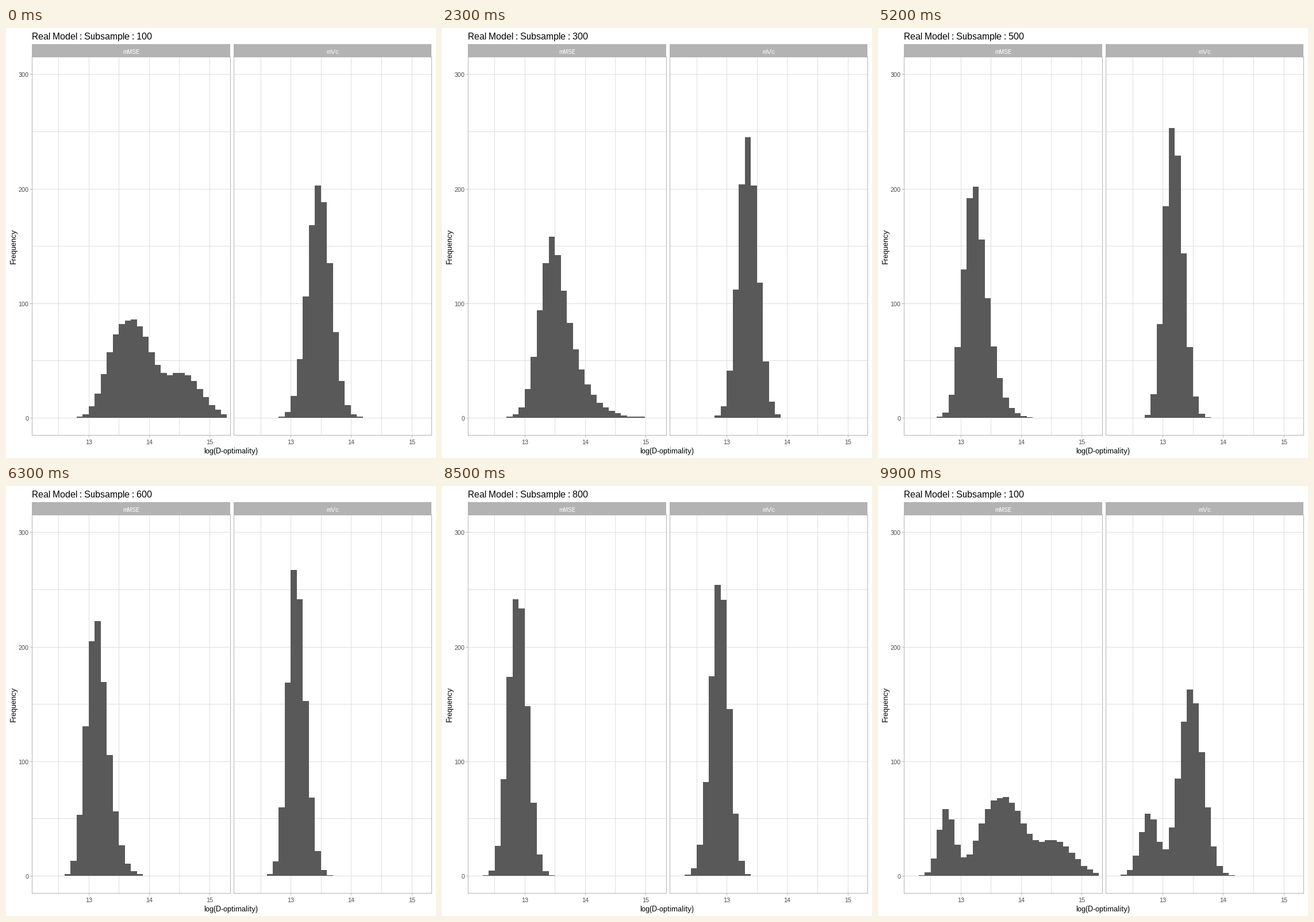
These frames come from a looping animation (748x748 px, 10 s). A matplotlib script:

```python
import numpy as np
import matplotlib.pyplot as plt
from matplotlib.animation import FuncAnimation
from matplotlib.patches import Rectangle

SIZE, DPI = 748, 88
BAR, GRID, EDGE, TICK_TEXT = "#595959", "#DEDEDE", "#B3B3B3", "#4D4D4D"
LOW, BINS = 12.3, 30          # first bin edge, number of 0.1-wide bins
BIN_PX, UNIT_PX, COUNT_PX = 10.46, 105.08, 1.993
ORIGIN, BASE_Y = 144.35, 678.6
LEFT, WIDTH, PANEL_STEP = 45.4, 345, 351.5
TOP, BOTTOM = 50, 708
FRAMES, STATES = 100, 9

centers = LOW + 0.05 + 0.1 * np.arange(BINS)


def bump(mode, left, right, power=2.0, total=1000):
    """Counts of a bell whose two sides have their own width."""
    d = centers - mode
    y = np.where(d < 0, np.exp(-np.abs(d / left) ** max(power, 2)),
                 np.exp(-np.abs(d / right) ** power))
    return np.round(total * y / y.sum())


# mode, left width and right width; the bells narrow as the subsample grows
MMSE = [(13.57, .332, .45), (13.48, .315, .375), (13.29, .198, .40),
        (13.24, .245, .295), (13.14, .212, .265), (13.00, .177, .27),
        (12.92, .215, .205), (12.76, .180, .205)]
MVC = [(13.47, .272, .28), (13.415, .228, .235), (13.345, .22, .24),
       (13.28, .20, .228), (13.19, .203, .228), (13.08, .165, .238),
       (13.00, .187, .243), (12.91, .203, .20), (12.78, .215, .194)]

# The smallest subsample has a second hump; later tails shrink to a bell.
two_humps = bump(13.67, .46, .46, 2.6, 690) + bump(14.55, .45, .45, 2, 310)
tails = np.linspace(1.15, 2, len(MMSE))
mmse = [two_humps] + [bump(*fit, power) for fit, power in zip(MMSE, tails)]
mvc = [bump(*fit) for fit in MVC]
states = np.stack([mmse, mvc], axis=1)

plt.rcParams.update({"font.family": "Liberation Sans",
                     "text.hinting": "native", "text.hinting_factor": 1})
fig = plt.figure(figsize=(SIZE / DPI, SIZE / DPI), dpi=DPI, facecolor="white")
ax = fig.add_axes([0, 0, 1, 1])
ax.set(xlim=(0, SIZE), ylim=(SIZE, 0))
ax.axis("off")


def box(x, y, w, h, color):
    return ax.add_patch(Rectangle((x, y), w, h, fc=color, ec="none", lw=0))


def label(x, y, text, px, color="black", ha="center", **kw):
    return ax.text(x, y, text, fontsize=px * 72 / DPI, color=color,
                   ha=ha, va="baseline", **kw)


def y_px(count):
    return int(BASE_Y - COUNT_PX * count)


def draw_panel(name, shift):
    left = int(LEFT + shift)
    right = left + WIDTH - (shift > 0)

    def x_px(value):
        return int(ORIGIN + shift + (value - 13) * UNIT_PX)

    box(left, 28, right - left, TOP - 28, EDGE)
    label((left + right) / 2, 45, name, 11, "white")
    for value in np.arange(12.5, 15.1, 0.5):
        box(x_px(value), TOP, 1, BOTTOM - TOP, GRID)
    for count in range(0, 301, 50):
        box(left, y_px(count), right - left, 1, GRID)

    first = round((LOW - 13) * 10)
    edges = [int(ORIGIN + shift + k * BIN_PX)
             for k in range(first, first + BINS + 1)]
    bars = [box(a, y_px(0), b - a, 0, BAR) for a, b in zip(edges, edges[1:])]

    for y in (TOP, BOTTOM):
        box(left, y, right - left + 1, 1, EDGE)
    for x in (left, right):
        box(x, TOP, 1, BOTTOM - TOP + 1, EDGE)
    for value in (13, 14, 15):
        box(x_px(value), BOTTOM + 1, 1, 3, EDGE)
        label(x_px(value) + 0.5, 724, str(value), 11, TICK_TEXT)
    return bars


panels = [draw_panel("mMSE", 0), draw_panel("mVc", PANEL_STEP)]
for count in range(0, 301, 100):
    box(42, y_px(count), 3, 1, EDGE)
    label(39.5, y_px(count) + 5, str(count), 11, TICK_TEXT, ha="right")

title = label(45, 20, "", 16, ha="left")
label(391, 740, "log(D-optimality)", 13)
label(17, 379, "Frequency", 13, rotation=90, rotation_mode="anchor")


def move(i):
    """First frame and number of steps of the change away from state i."""
    return (6 + 12 * i, 6) if i < 2 else (30 + 11 * (i - 2), 5)


def pose(frame):
    """Return the bar heights and the index of the nearest state."""
    here, part = 0, 0.0
    for i in range(STATES):
        start, steps = move(i)
        if frame >= start:
            here, part = i, min(1.0, (frame - start + 1) / steps)
    after = (here + 1) % STATES
    heights = states[here] * (1 - part) + states[after] * part
    return heights, after if part > 0.5 else here


def update(frame):
    heights, nearest = pose(frame)
    for bars, row in zip(panels, heights):
        for bar, count in zip(bars, row):
            top = y_px(count)
            bar.set_y(top)
            bar.set_height(y_px(0) - top)
            bar.set_visible(top < y_px(0))
    title.set_text(f"Real Model : Subsample : {100 * (nearest + 1)}")
    return [title]


anim = FuncAnimation(fig, update, frames=FRAMES, interval=100, repeat=True)
plt.show()
```
